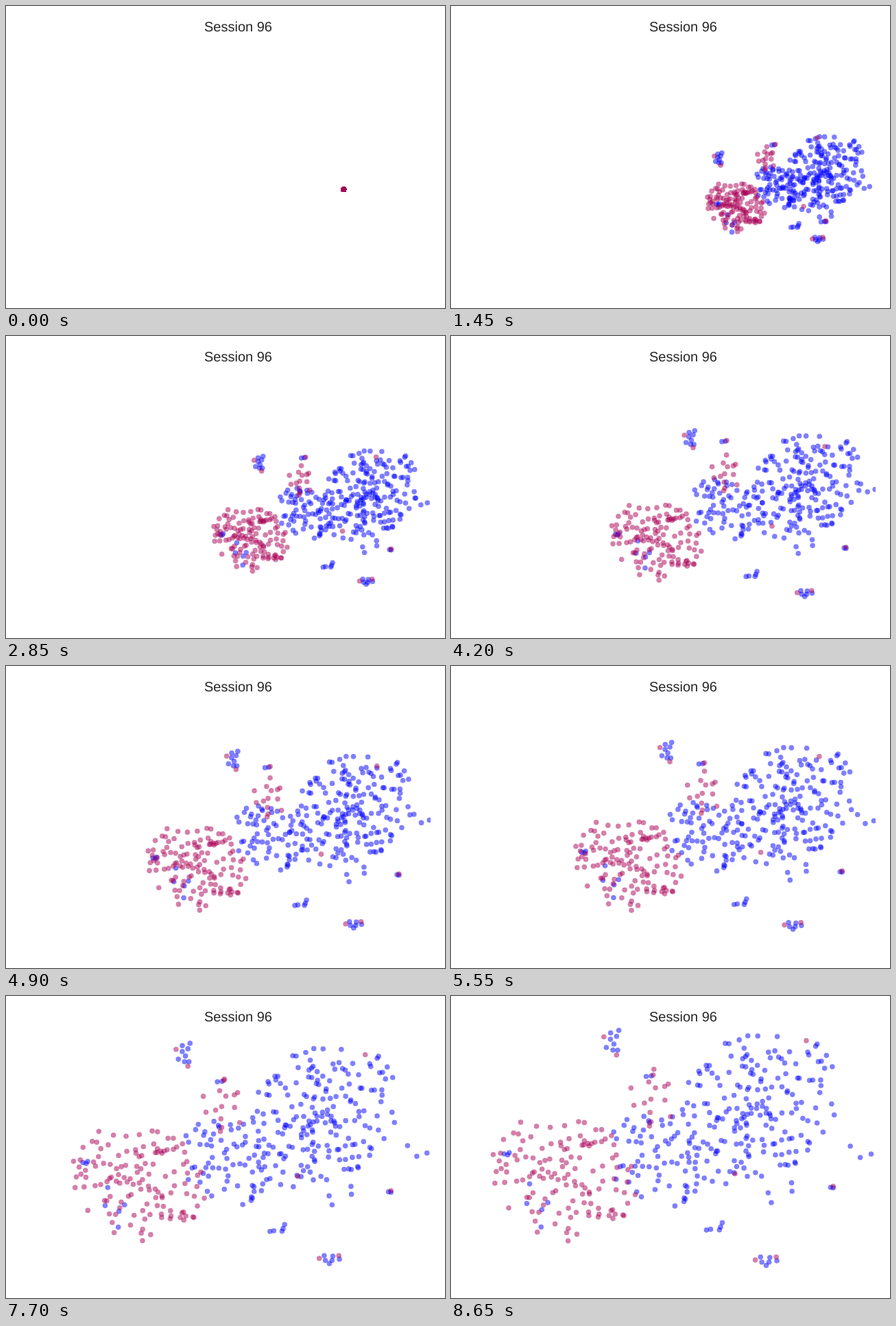
These frames come from a looping animation (640x440 px, 8.7 s). An HTML page:

```html
<!DOCTYPE html>
<html lang="en">
<head>
<meta charset="utf-8">
<title>Session 96</title>
<style>
  html, body { margin: 0; width: 100%; height: 100%; overflow: hidden; background: #fff; }
  svg { display: block; width: 640px; height: 440px; }
  text {
    font: 20px "Liberation Sans", Arial, sans-serif;
    fill: #262626;
    text-anchor: middle;
    text-rendering: geometricPrecision;
  }
  circle { fill-opacity: .5; }
</style>
</head>
<body>
<svg viewBox="0 0 640 440">
  <clipPath id="axes"><rect x="58" y="43" width="561" height="354"/></clipPath>
  <text x="338.5" y="37">Session 96</text>
  <g clip-path="url(#axes)">
    <g id="blue" fill="#00f"></g>
    <g id="red" fill="#aa0055"></g>
  </g>
</svg>
<script>
const LOOP = 8700, STEP = 50;
const FORMED = 1450, MIDWAY = 4200, END = 8650;
const ORIGIN = { x: 492.3, y: 267.3 };
const GOLDEN_ANGLE = Math.PI * (3 - Math.sqrt(5));
const clusters = [];

let seed = 96;
function random() {
  seed = (seed * 1664525 + 1013904223) >>> 0;
  return seed / 4294967296;
}

const lerp = (a, b, u) => a + (b - a) * u;
const progress = (t, from, to) => Math.min(1, Math.max(0, (t - from) / (to - from)));

function addDot(color, x, y) {
  const node = document.createElementNS('http://www.w3.org/2000/svg', 'circle');
  node.setAttribute('r', 3.8);
  document.getElementById(color).append(node);
  return { node, x, y };
}

// A jittered spiral of dots in an ellipse; a higher power packs the middle.
// path: centre when formed, midway and at the end. size: final radii.
function cluster({ blue = 0, red = 0, path, size, from = .5, power = .55, tilt = 0 }) {
  const count = blue + red;
  const dots = Array.from({ length: count }, (_, i) => {
    const angle = i * GOLDEN_ANGLE + 1.6 * random();
    const radius = ((i + random()) / count) ** power;
    const x = radius * Math.cos(angle), y = radius * Math.sin(angle);
    return addDot(i < blue ? 'blue' : 'red', x * size[0], (y + tilt * x) * size[1]);
  });
  clusters.push({ dots, path, from });
}

// Main clouds
cluster({ blue: 190, path: [[542, 243], [514, 218], [442, 163]], size: [124, 112], power: .66, tilt: -.22 });
cluster({ blue: 66, path: [[478, 264], [402, 252], [308, 240]], size: [86, 66], from: .45, tilt: .2 });
cluster({ red: 128, path: [[415, 292], [299, 298], [164, 265]], size: [108, 92], from: .4, power: .6, tilt: .12 });

// Satellites
cluster({ red: 14, path: [[458, 222], [398, 200], [290, 149]], size: [38, 45], from: .4 });
cluster({ blue: 2, red: 1, path: [[470, 202], [398, 153], [289, 116]], size: [6, 5] });
cluster({ blue: 8, red: 2, path: [[391, 222], [350, 149], [237, 66]], size: [15, 23] });
cluster({ blue: 6, red: 2, path: [[535, 340], [516, 375], [460, 386]], size: [18, 11] });
cluster({ blue: 5, path: [[505, 320], [443, 347], [391, 336]], size: [22, 6], tilt: -1.3 });
cluster({ blue: 2, red: 1, path: [[546, 314], [575, 309], [556, 279]], size: [4, 2] });
cluster({ blue: 3, path: [[389, 289], [242, 289], [81, 230]], size: [5, 5] });
cluster({ blue: 5, path: [[407, 318], [279, 320], [125, 308]], size: [25, 38], from: .4 });
cluster({ blue: 4, path: [[548, 306], [518, 305], [484, 284]], size: [36, 20] });
cluster({ blue: 3, path: [[600, 262], [604, 222], [592, 228]], size: [22, 26] });

// Strays inside the blue cloud
cluster({ red: 1, path: [[534, 192], [545, 161], [518, 65]], size: [0, 0] });
cluster({ red: 1, path: [[514, 292], [468, 277], [414, 259]], size: [0, 0] });

function render(t) {
  // All dots burst out of one spot, then the clusters drift apart.
  const burst = t < FORMED ? 1 - Math.exp(-((t / 500) ** 1.5)) : 1;
  const early = progress(t, FORMED, MIDWAY), late = progress(t, MIDWAY, END);
  const growth = progress(t, FORMED, END);
  const along = (path, axis) =>
    lerp(lerp(path[0][axis], path[1][axis], early), path[2][axis], late);

  for (const { dots, path, from } of clusters) {
    const cx = along(path, 0), cy = along(path, 1), scale = lerp(from, 1, growth);
    for (const { node, x, y } of dots) {
      node.setAttribute('cx', lerp(ORIGIN.x, cx + x * scale, burst).toFixed(2));
      node.setAttribute('cy', lerp(ORIGIN.y, cy + y * scale, burst).toFixed(2));
    }
  }
}

const start = performance.now();
function tick() {
  const t = (performance.now() - start) % LOOP;
  render(Math.floor(t / STEP) * STEP);
  requestAnimationFrame(tick);
}
tick();
</script>
</body>
</html>
```
